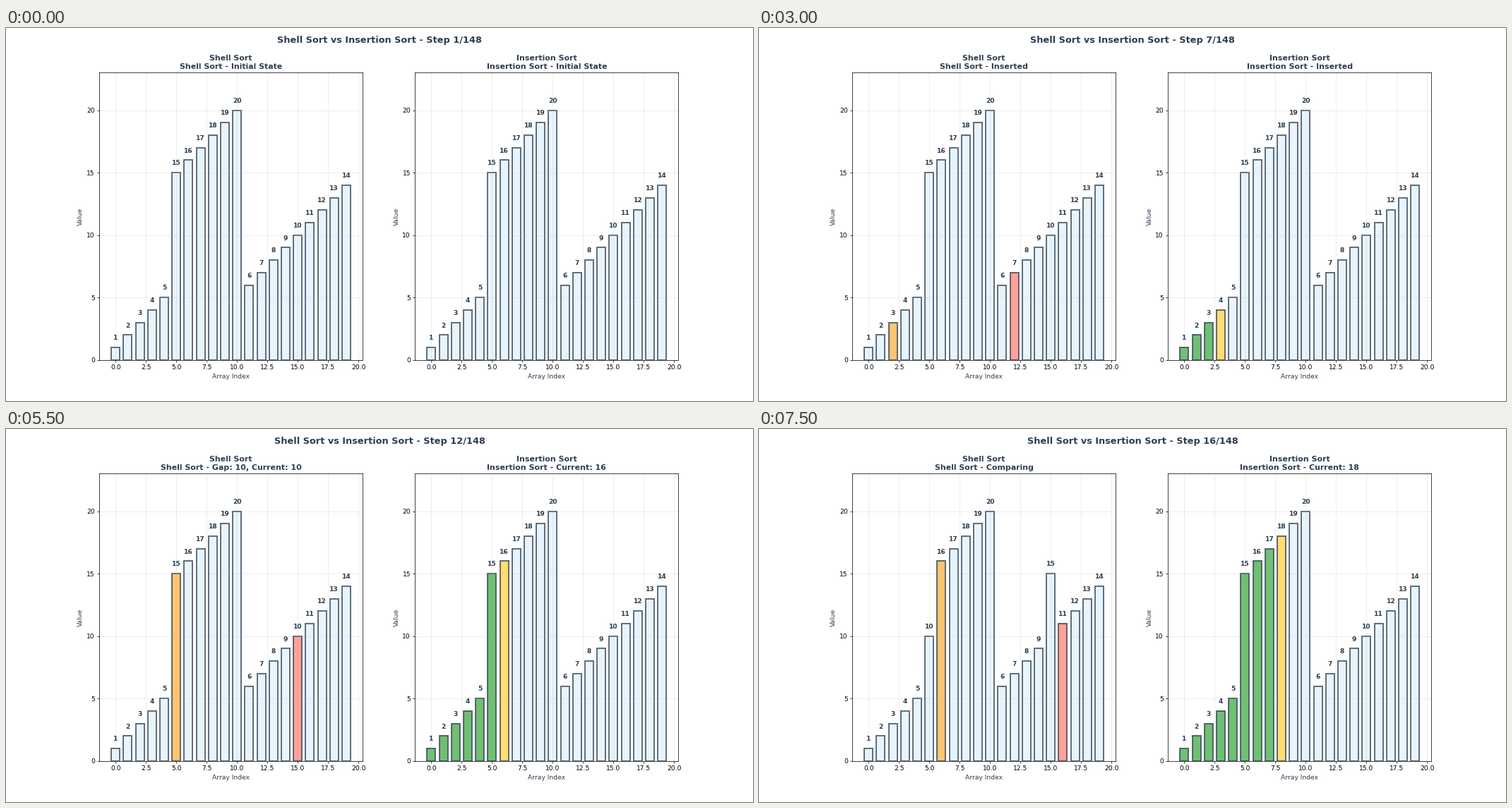
A matplotlib script that plays this animation: 1058x529 px, repeating every 8000 ms.

```python
from itertools import islice

import matplotlib.pyplot as plt
from matplotlib.animation import FuncAnimation

DATA = [*range(1, 6), *range(15, 21), *range(6, 15)]
TOTAL, SHOWN, STEP_MS = 148, 16, 500

INK = "#2c3e50"
PLAIN, SORTED = "#e3f2fd", "#4caf50"
CURRENT, COMPARED, KEY = "#ffd54f", "#ffb74d", "#ff8a80"


def shell_steps(values):
    """Yield (note, values, colours by index) for each step of a shell sort."""
    a = list(values)
    yield "Initial State", a[:], {}
    gap = len(a) // 2
    while gap:
        for i in range(gap, len(a)):
            j = i

            def marks():
                found = {i: CURRENT, j: KEY}
                if j >= gap:
                    found[j - gap] = COMPARED
                return found

            yield f"Gap: {gap}, Current: {a[i]}", a[:], marks()
            while j >= gap and a[j - gap] > a[j]:
                yield "Comparing", a[:], marks()
                a[j - gap], a[j] = a[j], a[j - gap]
                j -= gap
            yield "Inserted", a[:], marks()
        gap //= 2


def insertion_steps(values):
    """Yield (note, values, colours by index) for each step of an insertion sort."""
    a = list(values)
    yield "Initial State", a[:], {}
    for i in range(1, len(a)):
        marks = {**dict.fromkeys(range(i), SORTED), i: CURRENT}
        yield f"Current: {a[i]}", a[:], marks
        j = i
        while j and a[j - 1] > a[j]:
            yield "Comparing", a[:], marks
            a[j - 1], a[j] = a[j], a[j - 1]
            j -= 1
        yield "Inserted", a[:], marks


class Panel:
    def __init__(self, ax, name, steps):
        self.ax, self.name = ax, name
        self.steps = list(islice(steps(DATA), SHOWN))
        self.bars = ax.bar(range(len(DATA)), DATA, width=0.7, color=PLAIN,
                           edgecolor=INK, linewidth=2, alpha=0.8)
        self.labels = [ax.text(i, v + 0.5, str(v), ha="center", va="bottom",
                               color=INK, fontweight="bold")
                       for i, v in enumerate(DATA)]
        ax.set_ylim(0, max(DATA) * 1.15)
        ax.set_xlabel("Array Index", color=INK)
        ax.set_ylabel("Value", color=INK)
        ax.grid(True, alpha=0.3)

    def show(self, k):
        note, values, marks = self.steps[k]
        self.ax.set_title(f"{self.name}\n{self.name} - {note}", fontsize=12,
                          fontweight="bold", color=INK)
        for i, (bar, label, v) in enumerate(zip(self.bars, self.labels, values)):
            bar.set_height(v)
            bar.set_facecolor(marks.get(i, PLAIN))
            label.set_text(str(v))
            label.set_y(v + 0.5)


plt.rcParams["font.family"] = "DejaVu Sans"
fig, axes = plt.subplots(1, 2, figsize=(16, 8), dpi=66.125)
heading = fig.suptitle("", fontsize=14, fontweight="bold", color=INK)
panels = [Panel(axes[0], "Shell Sort", shell_steps),
          Panel(axes[1], "Insertion Sort", insertion_steps)]


def draw(k):
    heading.set_text(f"Shell Sort vs Insertion Sort - Step {k + 1}/{TOTAL}")
    for panel in panels:
        panel.show(k)
    return []


anim = FuncAnimation(fig, draw, frames=SHOWN, init_func=lambda: draw(0),
                     interval=STEP_MS, repeat=True, repeat_delay=0, blit=False)
plt.show()
```
